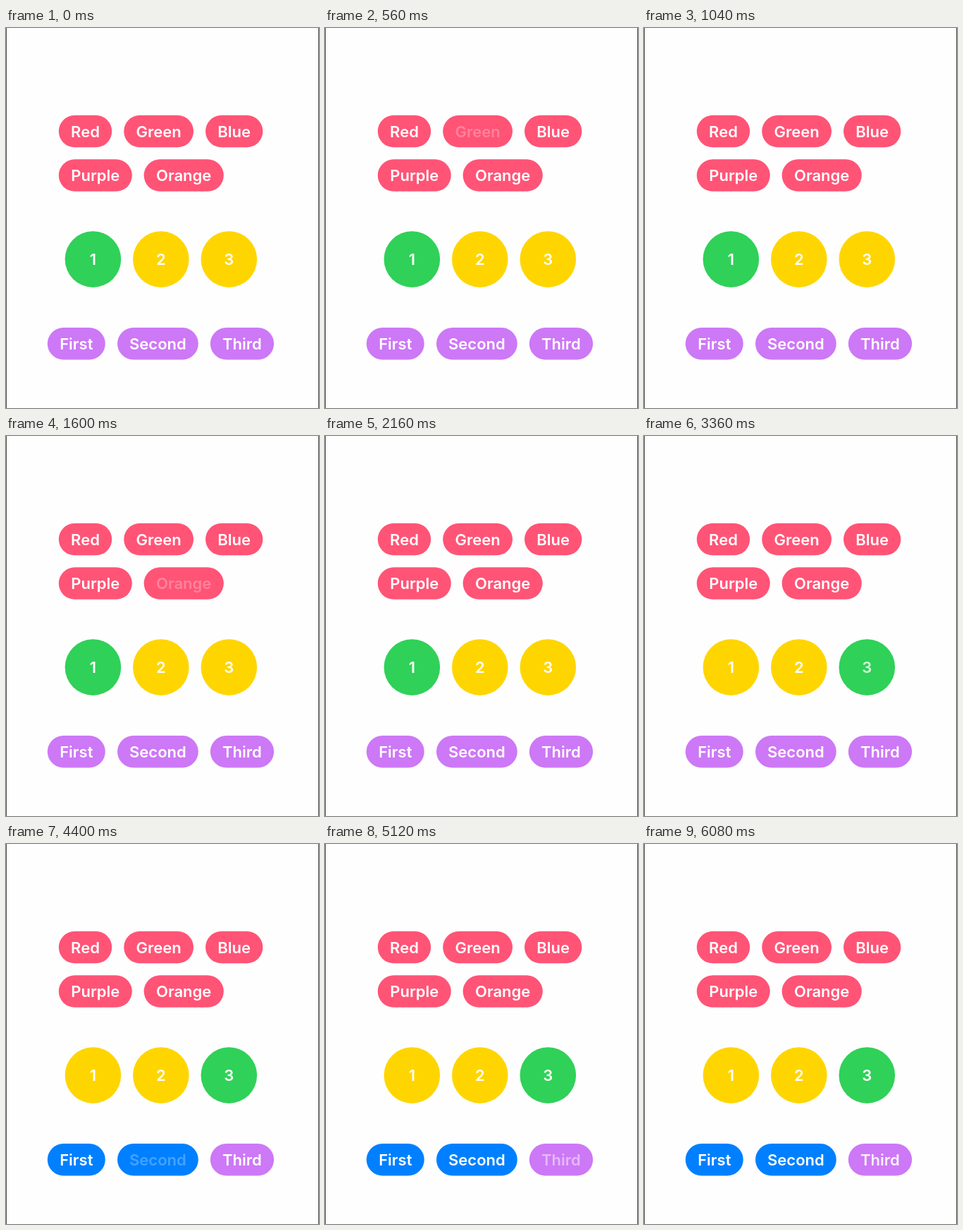
These frames come from a looping animation (444 px wide and 539 px high, 6160 ms). An HTML page:

```html
<!DOCTYPE html>
<html lang="en">
<head>
<meta charset="utf-8">
<title>Selectable buttons</title>
<style>
html, body { margin: 0; width: 100%; height: 100%; overflow: hidden; background: #fefefe; }
svg { display: block; width: 444px; height: 539px; }
text { font: 600 22px Inter, "Liberation Sans", sans-serif; fill: #fff; text-anchor: middle; }
</style>
</head>
<body>
<svg id="stage" viewBox="0 0 444 539"></svg>
<script>
const LOOP = 6160, STEP = 80, HOLD = 100, FADE = 280, DIM = 0.27;
const PINK = '#ff5476', YELLOW = '#ffd500', GREEN = '#30d158', PURPLE = '#cd78f6', BLUE = '#0080ff';
const stage = document.getElementById('stage');

function add(tag, attrs, content = '') {
  const el = document.createElementNS('http://www.w3.org/2000/svg', tag);
  for (const key in attrs) el.setAttribute(key, attrs[key]);
  el.textContent = content;
  stage.append(el);
  return el;
}

// taps holds release times; color(t) gives the fill
function button(label, x, y, w, h, color, taps = []) {
  const shape = add('rect', { x, y, width: w, height: h, rx: h / 2 });
  const text = add('text', { x: x + w / 2, y: y + h / 2 + 8 }, label);
  return { shape, text, color, taps };
}

const pill = (label, x, y, w, color, taps) => button(label, x, y, w, 45.5, color, taps);
const disc = (label, x, color, taps) => button(label, x, 288.3, 79.6, 79.6, color, taps);
const always = color => () => color;
const turns = (at, before, after) => t => t < at ? before : after;

add('path', { d: 'M.5 0V539M443.5 0V539', stroke: '#4a4a48' });

const pink = always(PINK);
const buttons = [
  pill('Red', 74.8, 123.8, 75.4, pink),
  pill('Green', 167.2, 123.8, 98.8, pink, [560]),
  pill('Blue', 283, 123.8, 81.3, pink),
  pill('Purple', 74.8, 186.3, 104, pink),
  pill('Orange', 195.6, 186.3, 113.2, pink, [1600]),
  disc('1', 83.6, turns(2320, GREEN, YELLOW)),
  disc('2', 180, t => t >= 2320 && t < 3160 ? GREEN : YELLOW, [2320]),
  disc('3', 276.5, turns(3160, YELLOW, GREEN), [3160]),
  pill('First', 58.8, 425, 82, turns(3840, PURPLE, BLUE), [3840]),
  pill('Second', 158, 425, 114.8, turns(4400, PURPLE, BLUE), [4400]),
  pill('Third', 289.8, 425, 90.3, always(PURPLE), [5040, 5840])
];

// Labels dim while pressed, then fade back after release
function opacity(t, release) {
  const age = t - release;
  if (age < -HOLD || age > FADE) return 1;
  return DIM + (1 - DIM) * Math.max(0, age) / FADE;
}

function draw(now) {
  const t = Math.floor(now % LOOP / STEP) * STEP;
  for (const b of buttons) {
    b.shape.setAttribute('fill', b.color(t));
    b.text.setAttribute('opacity', Math.min(1, ...b.taps.map(at => opacity(t, at))));
  }
  requestAnimationFrame(draw);
}
draw(0);
</script>
</body>
</html>
```
